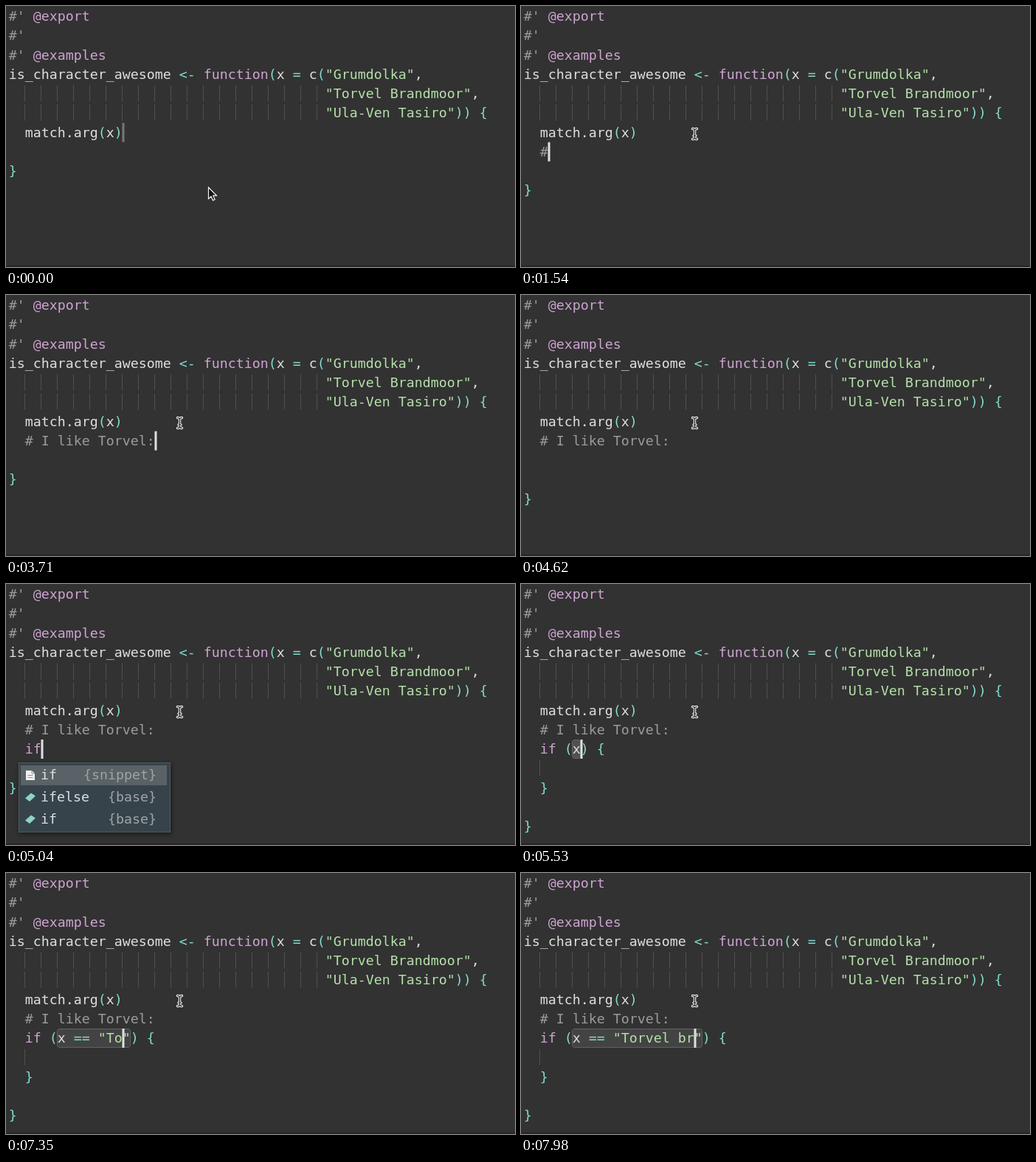
Recreate the animation shown at these times as an HTML page. Size 690 by 354 pixels, loop 8000 ms.

```html
<!DOCTYPE html>
<html lang="en">
<head>
<meta charset="utf-8">
<title>Typing a condition in a code editor</title>
<style>
  html, body { margin: 0; width: 100%; height: 100%; overflow: hidden; background: #323232; }
  svg { display: block; width: 690px; height: 354px; }
  text { font: 18.27px "DejaVu Sans Mono", Menlo, monospace; white-space: pre; fill: #dedede; }
  .doc, .key { fill: #cfa3d3; }
  .note { fill: #9b9b9b; }
  .str { fill: #b3e0a9; }
  .op { fill: #83dccf; }
  .guide { stroke: #6c6c6c; stroke-width: 1; stroke-dasharray: 1 1; }
  .field { fill: #434343; stroke: #8a8a8a; stroke-dasharray: 1 1; }
  .field.selected { fill: #505050; }
  .popup { filter: drop-shadow(1px 2px 3px #0008); }
  .popup .from { fill: #9fa4a6; text-anchor: end; }
</style>
</head>
<body>
<svg viewBox="0 0 690 354">
  <defs>
    <path id="beamShape" d="M-3 -7Q0 -7 0 -5Q0 -7 3 -7M0 -5V5M-3 7Q0 7 0 5Q0 7 3 7M-1.5 2.5H1.5"/>
  </defs>
  <rect width="690" height="354" fill="#323232"/>
  <rect y="352" width="690" height="2" fill="#2a2327"/>
  <g id="guides"></g>
  <rect id="field" class="field" rx="3"/>
  <g id="fixed"></g>
  <g id="edited"></g>
  <rect id="caret" width="3" height="26" fill="#e0e0e0"/>
  <g id="popup" class="popup">
    <rect x="17.5" y="242.5" width="205" height="94" fill="#37434a" stroke="#4d5a60"/>
    <rect x="20" y="246" width="198" height="27" fill="#596267"/>
    <path d="M27 253h8l4 4v9H27z" fill="#f2f2f2"/>
    <path d="M35 253v4h4M29.5 259.5h7M29.5 262.5h7" fill="none" stroke="#8a9296"/>
    <path id="tag" d="M26 290.5l8-7 6 4-8 7.5z" fill="#8fd3c6"/>
    <use href="#tag" y="30"/>
    <g id="options"></g>
  </g>
  <path id="arrow" d="M0 0V15.5L3.6 12.2 6 17.6 8.6 16.4 6.3 11.2H11z" fill="#111" stroke="#f4f4f4" stroke-width="1.2"/>
  <g id="beam" fill="none" stroke-linecap="round">
    <use href="#beamShape" stroke="#f0f0f0" stroke-width="3.4"/>
    <use href="#beamShape" stroke="#222" stroke-width="1.2"/>
  </g>
</svg>
<script>
const LOOP = 8000, TICK = 70;
const ROW = 26.25, LEFT = 3.7, CHAR = 11;
const FIRST_EDITED = 6, IF_ROW = 8;
const POPUP_AT = 4970, SNIPPET_AT = 5110, REPLACE_AT = 5530;

const $ = id => document.getElementById(id);
const colX = col => LEFT + col * CHAR;
const rowY = row => 1 + row * ROW;

const fixedCode = [
  "#' @export",
  "#'",
  "#' @examples",
  'is_character_awesome <- function(x = c("Grumdolka",',
  ' '.repeat(39) + '"Torvel Brandmoor",',
  ' '.repeat(39) + '"Ula-Ven Tasiro")) {'
];

// Each run pairs keys with their times; \b is backspace.
const runs = [
  ['\n# I ', [1400, 1540, 1610, 1820, 1890]],
  ['like Torvel:', [2100, 2170, 2310, 2380, 2450, 2730, 2870, 2940, 3080, 3220, 3360, 3710]],
  ['\nif', [3990, 4830, 4900]],
  [' == "', [5950, 6090, 6160, 6300, 6580]],
  ['to', [6790, 6860]],
  ['\b\bTorvel br', [7070, 7140, 7280, 7350, 7420, 7490, 7630, 7700, 7770, 7910, 7980]]
];
const events = runs.flatMap(([keys, times]) => times.map((time, i) => ({ time, key: keys[i] })));
events.push({ time: SNIPPET_AT, key: 'snippet' }, { time: REPLACE_AT, key: 'replace' });
events.sort((a, b) => a.time - b.time);

function editorAt(t) {
  let before = '  match.arg(x)', after = '\n\n}', last = -535;
  for (const { time, key } of events) {
    if (time > t) break;
    last = time;
    if (key === 'snippet') {
      before += ' (condition';
      after = ') {\n\n  }' + after;
    } else if (key === 'replace') {
      before = before.replace(/condition$/, 'x');
    } else if (key === '\b') {
      before = before.slice(0, -1);
    } else {
      before += key === '\n' ? '\n  ' : key;
      if (key === '"') after = '"' + after;
    }
  }
  const head = before.split('\n');
  return {
    lines: (before + after).split('\n'),
    row: FIRST_EDITED + head.length - 1,
    col: head[head.length - 1].length,
    last
  };
}

const TOKENS = /(?<doc>@\w+)|(?<note>#'|#.*)|(?<str>"[^"]*"?)|(?<key>\b(?:function|if)\b)|(?<op>[(){}=<-]+)|(?<plain>[\w.,]+)/g;
const escapeText = s => s.replace(/&/g, '&amp;').replace(/</g, '&lt;');

function lineMarkup(line, row) {
  const spans = [...line.matchAll(TOKENS)].map(m => {
    const kind = Object.keys(m.groups).find(k => m.groups[k] !== undefined);
    return `<tspan class="${kind}" x="${colX(m.index)}">${escapeText(m[0])}</tspan>`;
  });
  return `<text y="${rowY(row) + 19}">${spans.join('')}</text>`;
}
const codeMarkup = (lines, first) => lines.map((line, i) => lineMarkup(line, first + i)).join('');

function guideMarkup(col, row, id = '') {
  const x = Math.round(colX(col)) - 0.5, y = Math.round(rowY(row));
  return `<line class="guide" id="${id}" x1="${x}" x2="${x}" y1="${y + 2}" y2="${y + 24}"/>`;
}

let guides = guideMarkup(2, IF_ROW + 1, 'bodyGuide');
for (const row of [4, 5])
  for (let col = 2; col < 39; col += 2) guides += guideMarkup(col, row);
$('guides').innerHTML = guides;
$('fixed').innerHTML = codeMarkup(fixedCode, 0);
$('options').innerHTML = [['if', '{snippet}'], ['ifelse', '{base}'], ['if', '{base}']]
  .map(([name, from], i) => `<text x="47" y="${265 + 30 * i}">${name}</text>` +
    `<text class="from" x="204" y="${265 + 30 * i}">${from}</text>`).join('');

const setAttrs = (el, attrs) => Object.entries(attrs).forEach(([k, v]) => el.setAttribute(k, v));
const show = (el, on) => el.setAttribute('visibility', on ? 'visible' : 'hidden');
const clamp = v => Math.min(1, Math.max(0, v));
const ease = v => v * v * (3 - 2 * v);

// Solid, fade out, hidden, fade in over one second since the last key.
function blink(age) {
  const p = age % 1000;
  return p < 600 ? 1 - ease(clamp((p - 450) / 150)) : ease(clamp((p - 850) / 150));
}

function drawMouse(t) {
  const k = ease(clamp((t - 70) / 420));
  const place = `translate(${274.5 - 39 * k} ${246 - 72.5 * k})`;
  const isBeam = t >= 280;
  $('arrow').setAttribute('transform', place);
  $('beam').setAttribute('transform', place);
  show($('arrow'), !isBeam);
  show($('beam'), isBeam);
}

function drawField(t, line) {
  const active = t >= SNIPPET_AT;
  show($('field'), active);
  show($('bodyGuide'), active);
  if (!active) return;
  const end = line.indexOf(') {');
  setAttrs($('field'), {
    x: Math.floor(colX(6)) + 0.5, y: Math.floor(rowY(IF_ROW)) + 0.5,
    width: (end - 6) * CHAR, height: 25,
    class: t < 5950 ? 'field selected' : 'field'
  });
}

let drawnCode = '';
function draw(t) {
  const { lines, row, col, last } = editorAt(t);
  const code = lines.join('\n');
  if (code !== drawnCode) {
    $('edited').innerHTML = codeMarkup(lines, FIRST_EDITED);
    drawnCode = code;
  }
  drawField(t, lines[IF_ROW - FIRST_EDITED]);
  setAttrs($('caret'), { x: colX(col) - 0.2, y: rowY(row), opacity: blink(t - last) });
  show($('popup'), t >= POPUP_AT && t < SNIPPET_AT);
  drawMouse(t);
}

const start = performance.now();
function loop() {
  const t = (performance.now() - start) % LOOP;
  draw(Math.floor(t / TICK) * TICK);
  requestAnimationFrame(loop);
}
loop();
</script>
</body>
</html>
```
